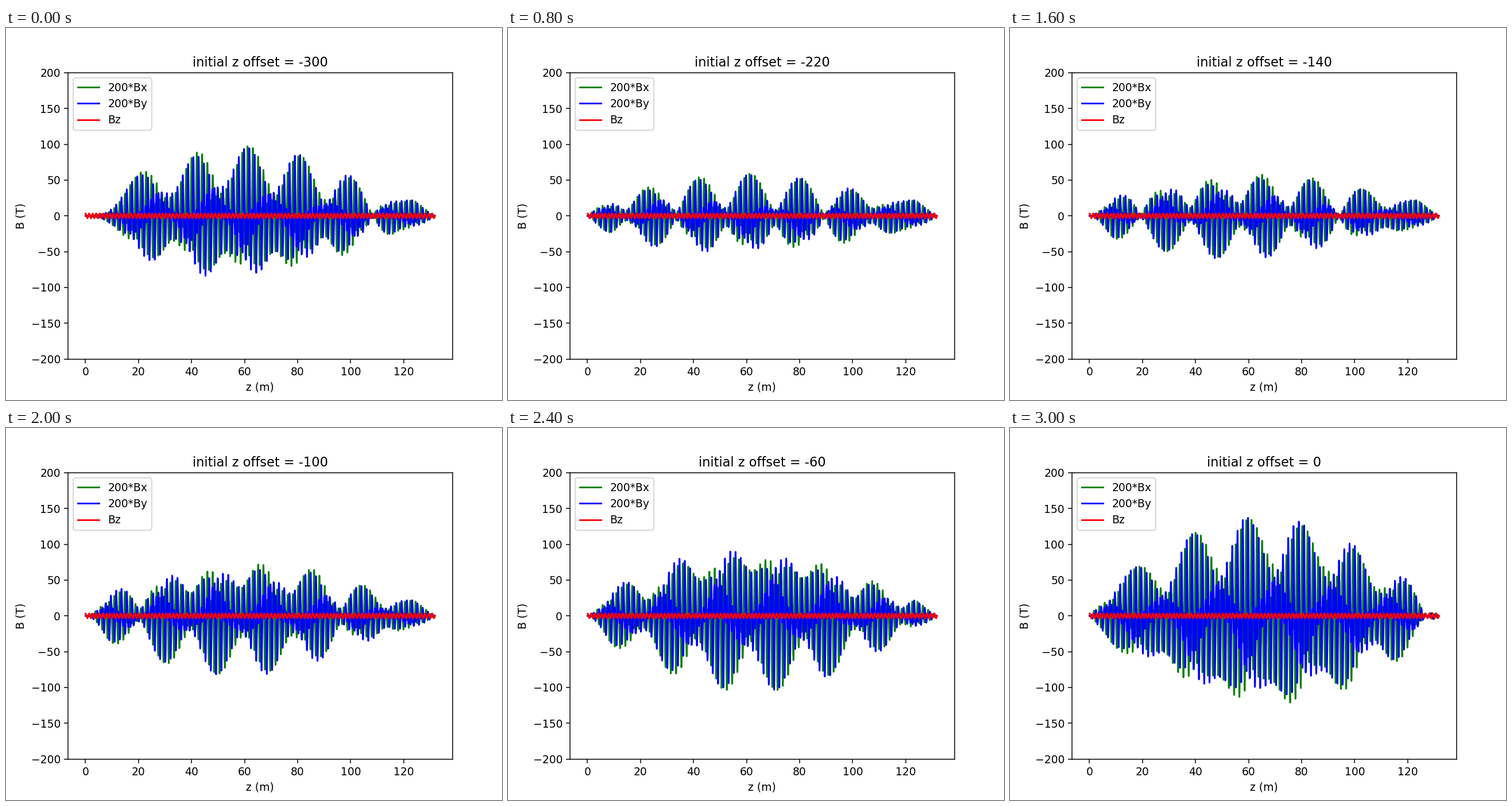
These frames come from a looping animation (864 px wide and 648 px high, 3.1 s). A matplotlib script:

```python
import numpy as np
import matplotlib.pyplot as plt
from matplotlib.animation import FuncAnimation

LENGTH = 131.75      # channel length in m
CELL = 1.32          # period of the solenoid field in m
ORBIT = 3.2 * CELL   # period of the transverse oscillation in m

# offset, main amplitude, one envelope crest and the crest spacing
OFFSETS = [-300, -260, -180, -140, -100, -60, 0]
AMPLITUDE = [76, 48, 26, 40, 62, 85, 117]
CREST = [62, 60, 63, 66, 68, 71.5, 78.6]
SPACING = [18.6, 18.6, 18.4, 18.7, 18.8, 19.2, 19.4]

z = np.linspace(0, LENGTH, 3000)


def wave(period, crest):
    return np.cos(2 * np.pi * (z - crest) / period)


gradient = wave(CELL, 0.8 * CELL)
orbit_x = wave(ORBIT, 46.3)
orbit_y = wave(ORBIT, 45.05)
ramp = np.clip(np.minimum(z / 9, (LENGTH - z) / 8), 0, 1)
bz = 3.4 * wave(CELL, 0.05 * CELL)


def envelope(offset):
    """Two slowly beating waves, one of them depending on the offset."""
    amplitude, crest, spacing = (np.interp(offset, OFFSETS, row)
                                 for row in (AMPLITUDE, CREST, SPACING))
    width = np.interp(offset, [-100, 0], [118, 132])
    main = amplitude * np.clip(np.sin(np.pi * z / width), 0, 1)
    slip = 0.9 * ((offset + 150) / 150) ** 2 * np.exp(-z / 12)
    turns = (z - crest) / spacing + slip
    return np.abs(main + 22 * ramp * np.exp(2j * np.pi * turns))


fig, ax = plt.subplots(figsize=(6.4, 4.8), dpi=135)
line_x, = ax.plot(z, 0 * z, color="green", label="200*Bx")
line_y, = ax.plot(z, 0 * z, color="blue", label="200*By")
ax.plot(z, bz, color="red", label="Bz")
ax.set_ylim(-200, 200)
ax.set_xlabel("z (m)")
ax.set_ylabel("B (T)")
ax.legend(loc="upper left")
title = ax.set_title("")


def update(i):
    offset = -300 + 10 * i
    strength = envelope(offset) * gradient
    line_x.set_ydata(strength * orbit_x)
    line_y.set_ydata(strength * orbit_y)
    title.set_text(f"initial z offset = {offset}")
    return line_x, line_y, title


anim = FuncAnimation(fig, update, frames=31, interval=100, repeat=True)
plt.show()
```
